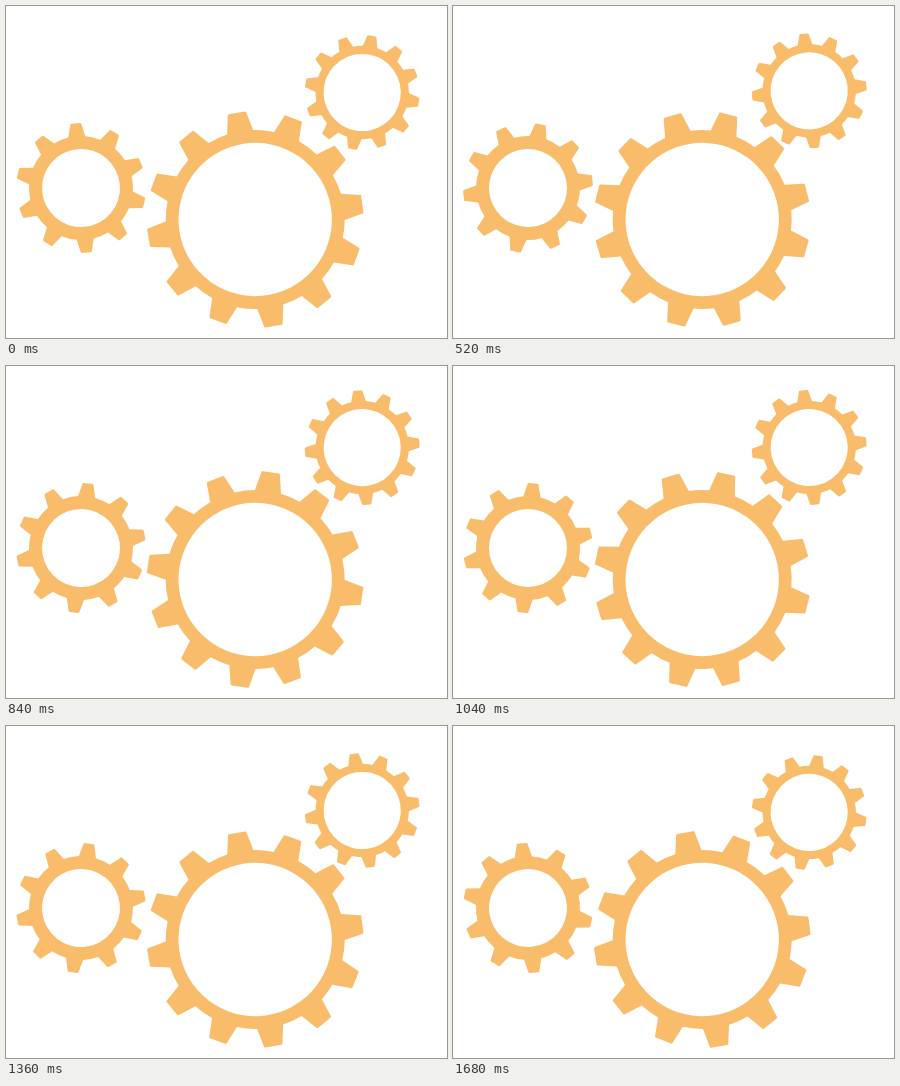
Recreate the animation shown at these times as an HTML page. Size 441 by 332 pixels, loop 1720 ms.

```html
<!DOCTYPE html>
<html lang="en">
<head>
<meta charset="utf-8">
<title>Gears</title>
<style>
  html, body { margin: 0; width: 100%; height: 100%; overflow: hidden; background: #fff; }
  svg { display: block; width: 100vw; height: 100vh; }
  path { fill: #f9bc6a; fill-rule: evenodd; }
</style>
</head>
<body>
<svg viewBox="0 0 441 332"></svg>
<script>
const LOOP = 1720, STEP = 40;
const times = [0, 520, 720, 950, 1040, 1240, 1480, 1680, LOOP];

// Each gear swings out and back; turn: clockwise degrees reached at the times
// nudge: degrees by which the first teeth stand off the even spacing
// bob: pixels of lift per degree of turn
const gears = [
  { x: 249.2, y: 213.5, teeth: 12, hole: 76.7, rim: 89.5, tip: 108.5, top: 9.6, base: 13.2,
    nudge: [0, 0.5, 1.6, 1.6],
    start: -9.8, turn: [0, 23.8, 61.3, 85.5, 82.7, 51.3, 12.2, 0.8, 0] },
  { x: 75, y: 182, teeth: 10, hole: 39, rim: 52, tip: 65, top: 5.8, base: 8.6,
    start: -4.7, turn: [0, -20.1, -49.3, -65.5, -62.8, -39.3, -11.1, -0.6, 0] },
  { x: 356.2, y: 86.5, teeth: 12, hole: 38.6, rim: 46.7, tip: 57.5, top: 5, base: 7.4,
    start: 9.8, turn: [0, -15, -36, -47.5, -45.5, -29, -8.5, -0.7, 0], bob: 0.11 }
];

const polar = (r, a) => [r * Math.sin(a), -r * Math.cos(a)].map(v => v.toFixed(2)).join(' ');

function gearPath({ teeth, hole, rim, tip, top, base, nudge = [] }) {
  const foot = Math.asin(base / rim);
  const edge = Math.asin(top / tip);
  const soft = 1.5 / tip;
  let d = '';
  for (let i = 0; i < teeth; i++) {
    const a = (i * 360 / teeth + (nudge[i] || 0)) * Math.PI / 180;
    d += (i ? `A${rim} ${rim} 0 0 1 ` : 'M') + polar(rim, a - foot)
      + 'L' + polar(tip - 1.5, a - edge)
      + 'Q' + polar(tip, a - edge) + ' ' + polar(tip, a - edge + soft)
      + 'L' + polar(tip, a + edge - soft)
      + 'Q' + polar(tip, a + edge) + ' ' + polar(tip - 1.5, a + edge)
      + 'L' + polar(rim, a + foot);
  }
  d += `A${rim} ${rim} 0 0 1 ${polar(rim, -foot)}Z`;
  return d + `M${hole} 0A${hole} ${hole} 0 1 0 ${-hole} 0A${hole} ${hole} 0 1 0 ${hole} 0Z`;
}

// Smooth cubic through the turn values, continuous across the loop seam
function makeCurve(values) {
  const n = times.length - 1;
  const span = i => times[i + 1] - times[i];
  const rate = i => (values[i + 1] - values[i]) / span(i);
  const slope = i => {
    const a = (i + n - 1) % n, b = i % n;
    return (rate(a) * span(b) + rate(b) * span(a)) / (span(a) + span(b));
  };
  return t => {
    let i = 0;
    while (i < n - 1 && t >= times[i + 1]) i++;
    const h = span(i), u = (t - times[i]) / h, v = 1 - u;
    return values[i] * v * v * (1 + 2 * u) + values[i + 1] * u * u * (3 - 2 * u)
      + h * u * v * (slope(i) * v - slope(i + 1) * u);
  };
}

const svg = document.querySelector('svg');
for (const g of gears) {
  g.el = document.createElementNS(svg.namespaceURI, 'path');
  g.el.setAttribute('d', gearPath(g));
  g.curve = makeCurve(g.turn);
  svg.append(g.el);
}

function draw(now) {
  const t = Math.floor((now % LOOP) / STEP) * STEP;
  for (const g of gears) {
    const turn = g.curve(t);
    const y = g.y + (g.bob || 0) * turn;
    g.el.setAttribute('transform', `translate(${g.x} ${y}) rotate(${g.start + turn})`);
  }
}

const begin = performance.now();
function tick() {
  draw(performance.now() - begin);
  requestAnimationFrame(tick);
}
tick();
</script>
</body>
</html>
```
